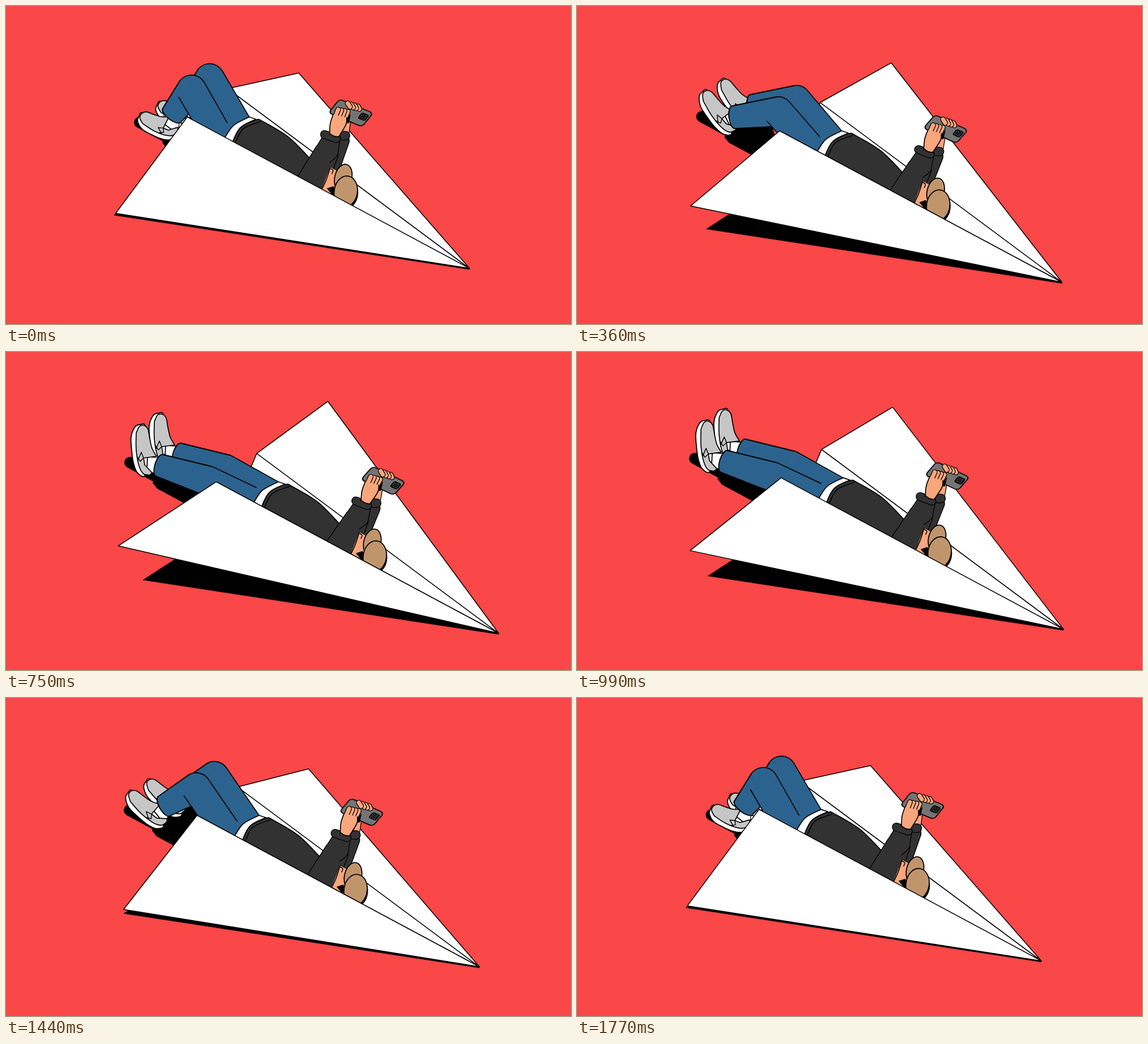
An HTML page with a canvas for the animation above (1.8 s loop, 998 by 561 pixels).

```html
<!DOCTYPE html>
<html lang="en">
<head>
<meta charset="utf-8">
<title>Paper plane</title>
<style>
  html, body { margin: 0; width: 100%; height: 100%; overflow: hidden; background: #fa4747; }
  canvas { display: block; }
</style>
</head>
<body>
<canvas id="stage" width="998" height="561"></canvas>
<script>
const ctx = document.getElementById('stage').getContext('2d');
const LOOP = 1800, STEP = 30, PI = Math.PI;
const INK = '#000', PAPER = '#fff', JEANS = '#2c638e', SHIRT = '#323232',
  SKIN = '#f9a67d', HAIR = '#c1956c', SHOE = '#c6c6c6', PHONE = '#747474';

// --- timing ---
const clamp = x => Math.max(0, Math.min(1, x));
const swing = p => (1 - Math.cos(PI * clamp(p))) / 2;

// Quick push forward, then an almost even drift back across the loop seam
function driftAt(t) {
  if (t >= 140 && t < 505) return -6 + 66 * swing((t - 140) / 365);
  const p = ((t < 140 ? t + LOOP : t) - 505) / (LOOP - 365);
  return 60 - 66 * (p - 0.5 * p * (1 - p) * (0.65 - p));
}
function liftAt(t) {
  return 1.04 * (t < 640 ? Math.sin(PI / 2 * clamp((t - 140) / 500)) : 1 - swing((t - 640) / 960));
}

// knee x, y, ankle x, y, shoe x, y, shoe angle
const bent = [328,148, 293,193, 267,212, -57];
const kick = [318,162, 239,172, 209,164, -30];
const flat = [305,194, 220,167, 189,140, 0];
const sink = [312,178, 224,167, 191,146, -12.5];
const fold = [319,147, 262,180, 229,186, -42];
const poses = [[0, bent], [110, bent], [360, kick], [600, flat], [990, flat],
  [1230, sink], [1440, fold], [1690, bent], [LOOP, bent]];

function poseAt(t) {
  let i = 0;
  while (i < poses.length - 2 && t >= poses[i + 1][0]) i++;
  const gap = k => poses[k + 1][0] - poses[k][0];
  return bent.map((_, n) => {
    const rate = k => (poses[k + 1][1][n] - poses[k][1][n]) / gap(k);
    const slope = k => {
      if (k < 1 || k > poses.length - 2) return 0;
      const a = rate(k - 1), b = rate(k);
      return a * b <= 0 ? 0 : 2 * a * b / (a + b);
    };
    const w = gap(i), u = (t - poses[i][0]) / w, v = 1 - u;
    return poses[i][1][n] * (1 + 2 * u) * v * v + slope(i) * w * u * v * v
      + poses[i + 1][1][n] * u * u * (3 - 2 * u) - slope(i + 1) * w * u * u * v;
  });
}

// --- drawing helpers ---
const pairs = a => a.flatMap((x, i) => i % 2 ? [] : [[x, a[i + 1]]]);
const polar = ([x, y], r, a) => [x + r * Math.cos(a), y + r * Math.sin(a)];
const begin = () => ctx.beginPath();
function lines(pts, join) {
  pts.forEach((p, i) => i || join ? ctx.lineTo(...p) : ctx.moveTo(...p));
}
function spline(pts, join, closed) {
  const n = pts.length;
  const at = i => closed ? pts[(i + n) % n] : pts[Math.max(0, Math.min(n - 1, i))];
  join ? ctx.lineTo(...pts[0]) : ctx.moveTo(...pts[0]);
  for (let i = 0; i < (closed ? n : n - 1); i++) {
    const a = at(i - 1), b = at(i), c = at(i + 1), d = at(i + 2);
    ctx.bezierCurveTo(b[0] + (c[0] - a[0]) / 6, b[1] + (c[1] - a[1]) / 6,
      c[0] - (d[0] - b[0]) / 6, c[1] - (d[1] - b[1]) / 6, c[0], c[1]);
  }
}
function paint(fill, width) {
  if (fill) { ctx.fillStyle = fill; ctx.fill(); }
  if (width) { ctx.strokeStyle = INK; ctx.lineWidth = width; ctx.stroke(); }
}
function poly(pts, fill, width) { begin(); lines(pts); ctx.closePath(); paint(fill, width); }
function line(pts, width = 1.7) { begin(); lines(pts); paint(null, width); }
function curve(pts, width = 1.7) { begin(); spline(pts); paint(null, width); }
function oval(x, y, rx, ry, turn, fill) { begin(); ctx.ellipse(x, y, rx, ry, turn, 0, 2 * PI); paint(fill, 1.8); }

// Outlined chain of circles [x, y, r]
function limb(fill, ...joints) {
  begin();
  joints.slice(1).forEach(([x2, y2, r2], i) => {
    const [x1, y1, r1] = joints[i], a = Math.atan2(y2 - y1, x2 - x1);
    ctx.moveTo(...polar([x1, y1], r1, a + PI / 2));
    ctx.arc(x1, y1, r1, a + PI / 2, a + PI * 1.5);
    ctx.arc(x2, y2, r2, a - PI / 2, a + PI / 2);
    ctx.closePath();
  });
  paint(null, 2.6);
  paint(fill);
}

// --- figure ---
function shoe(x, y, deg, ankle) {
  const r = deg * PI / 180, c = Math.cos(r), s = Math.sin(r);
  const squash = 1 - 0.2 * (deg / 57) ** 4;
  const at = (...a) => pairs(a).map(([u, v]) => [x + u * c - v * squash * s, y + u * s + v * squash * c]);
  limb(PAPER, [...at(14,26)[0], 13], [...ankle, 13]);
  begin();
  spline(at(6,44, -8,40, -15,22, -18,0, -19,-23, -12,-41, -3,-45, 6,-42, 10,0), false, true);
  paint(PAPER, 1.8);
  begin();
  spline(at(-10,-30, -4,-42, 5,-43, 11,-36, 14,-20, 18,-3, 26,11));
  lines(at(3,14), true);
  spline(at(5,26, 18,40), true);
  spline(at(14,44, 3,42, -5,28, -10,0, -10,-30), true);
  paint(SHOE, 1.7);
  line(at(-7,18, -1,4, 3,14, -3,20, -8,12), 1.4);
}

function leg(knee, ankle, end) {
  const R = 26, q = PI / 2, back = [end[0] - 20, end[1] + 16];
  const shin = Math.atan2(ankle[1] - knee[1], ankle[0] - knee[0]);
  const thigh = Math.atan2(back[1] - knee[1], back[0] - knee[0]);
  const cuff = () => ctx.ellipse(...ankle, 8, 20, shin, -q, q);
  const top = () => { ctx.arc(...knee, R, shin + q, thigh - q); ctx.lineTo(...end); };
  const under = polar(knee, R, thigh + q), low = polar(back, R, thigh + q);

  begin(); lines([polar(knee, R, shin - q)]); cuff();
  ctx.arc(...knee, R, shin + q, shin + q); paint(JEANS, 1.7);
  begin(); lines([under, knee]); top();
  lines([[388, 232], low], true); paint(JEANS);
  begin(); ctx.ellipse(...ankle, 8, 20, shin, 0, q); top(); paint(null, 1.7);
  line([under, low]);
}

// Shadow of the shoes and shins on the ground
function castShadow(x, y) {
  begin(); lines([[x + 10, y], [x + 60, y + 27]]);
  ctx.strokeStyle = INK; ctx.lineWidth = 20; ctx.stroke();
  poly(pairs([60,15, 50,36, 58,46, 110,74, 150,70, 125,-15]).map(p => [x + p[0], y + p[1]]), INK);
}

function legs([kx, ky, ax, ay, sx, sy, deg]) {
  castShadow(sx - 31 + 0.17 * deg, sy + 22 + 0.5 * deg);
  for (const [dx, dy, end] of [[32, -20, [430, 196]], [0, 0, [391, 206]]]) {
    const ankle = [ax + dx, ay + dy];
    shoe(sx + dx, sy + dy, deg, ankle);
    leg([kx + dx, ky + dy], ankle, end);
  }
}

function torso() {
  begin();
  spline(pairs([386,234, 402,211, 430,196]));
  spline(pairs([442,200, 416,214, 400,242]), true);
  paint(PAPER, 1.7);
  begin();
  spline(pairs([400,241, 414,215, 442,201, 456,205, 500,232, 538,270]));
  lines([[562, 335], [480, 300]], true);
  paint(SHIRT, 1.7);
  curve(pairs([405,243, 419,217, 450,204]), 1.5);
}

function phone() {
  ctx.save();
  ctx.transform(0.923, 0.385, -0.625, 0.78, 589.5, 164.5);
  begin(); ctx.roundRect(0, 0, 64, 31, 6); paint(PHONE, 1.8);
  begin(); ctx.roundRect(48, 7, 13, 12, 3); paint('#303030', 1.4);
  for (let i = 0; i < 3; i++) {
    begin(); ctx.arc(...polar([54.5, 13], 3.2, i * PI * 2 / 3), 1.8, 0, 7); paint('#484848', 1);
  }
  ctx.restore();
}

function arms(angle) {
  ctx.save();
  ctx.translate(515, 300); ctx.rotate(angle); ctx.translate(-515, -300);
  limb(SKIN, [600, 222, 6], [602, 206, 6]);
  limb(SHIRT, [595, 238, 11], [579, 284, 11]);
  limb(SHIRT, [594, 229, 7], [600, 229, 7]);
  phone();
  for (let i = 3; i >= 0; i--) limb(SKIN, [608 + i * 5.5, 178 + i * 1.3, 3.6], [604 + i * 6, 172 + i * 1.8, 3.6]);

  limb(SHIRT, [573, 240, 16], [565, 262, 21], [541, 312, 27]);
  limb(SHIRT, [563, 227, 6.5], [584, 234, 6.5]);
  curve(pairs([572,276, 580,270, 587,262]), 1.3);

  poly(pairs([603,189, 609,192, 606,207, 600,207]), INK);
  for (let i = 3; i >= 0; i--) limb(SKIN, [581 + i * 5.6, 198 + i, 3.6], [587 + i * 5.7, 183 + i * 1.2, 3.6]);
  const rim = pairs([572,227, 573,208, 578,192]), heel = pairs([602,197, 601,209, 588,231]);
  begin(); spline(rim); lines([[584, 193], [598, 196]], true); spline(heel, true); paint(SKIN);
  curve(rim); curve(heel);
  curve(pairs([572,225, 580,230, 589,231]));
  ctx.restore();
}

function head() {
  poly(pairs([557,326, 573,285, 585,291, 590,315, 582,345]), SKIN);
  curve(pairs([557,326, 566,307, 573,285]), 1.5);
  curve(pairs([573,287, 578,290, 576,296]), 1.4);
  poly(pairs([567,322, 579,318, 584,336, 577,334]), INK);
  oval(596, 303, 15, 24, 0.25, HAIR);
  oval(602, 331, 19.5, 26, 0.1, INK);
  oval(600.5, 327.5, 20.5, 27.5, 0.15, HAIR);
}

function draw(t) {
  const drift = driftAt(t), lift = liftAt(t);
  ctx.setTransform(1, 0, 0, 1, 0, 0);
  ctx.fillStyle = '#fa4747';
  ctx.fillRect(0, 0, 998, 561);
  ctx.translate(drift, drift * 0.647);
  ctx.lineCap = ctx.lineJoin = 'round';

  const nose = [819, 463], fin = [392, 146];
  poly([[191.5, 369], [330, 279], nose, [819, 464.7]], INK, 0.8);
  poly([fin, [375, 186], [420, 250], nose], PAPER, 1.5);
  poly([[517.5, 118.5 - 64 * lift], fin, nose], PAPER, 1.5);
  legs(poseAt(t));
  torso();
  arms(0.055 * drift / 51);
  head();
  poly([[320.5, 196], nose, [194 - 46.5 * lift, 366 - 56.5 * lift]], PAPER, 1.5);
}

const start = performance.now();
function tick() {
  const t = (performance.now() - start) % LOOP;
  draw(Math.floor(t / STEP) * STEP);
  requestAnimationFrame(tick);
}
tick();
</script>
</body>
</html>
```
